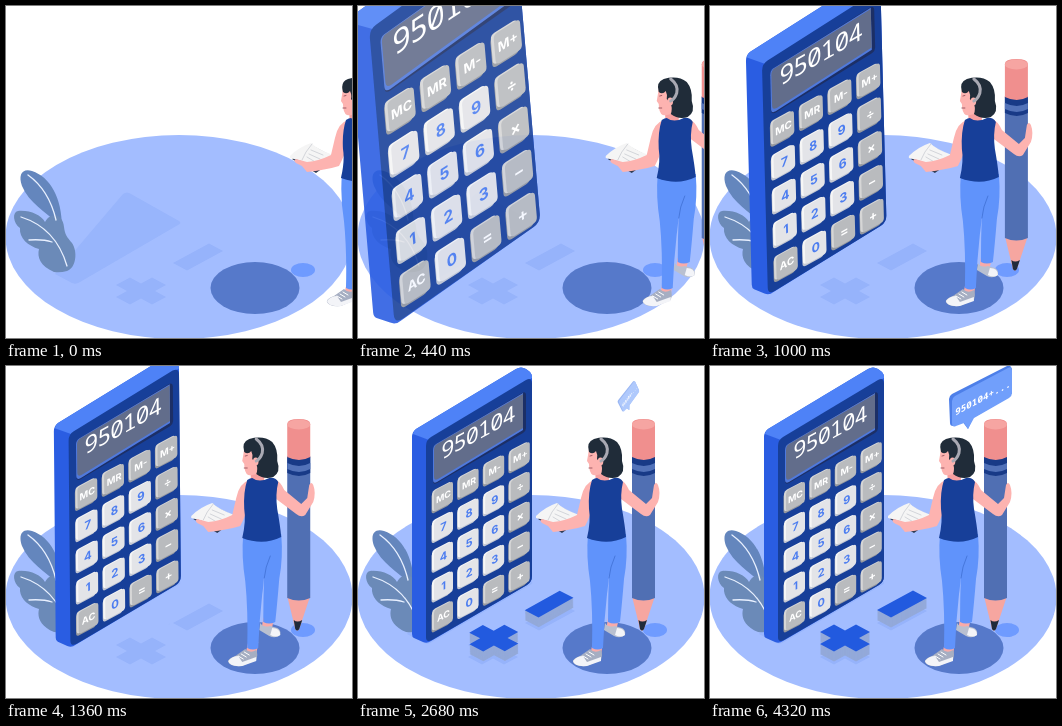
Animation of 346x332 px, one loop 4360 ms. Source, as an HTML page:

```html
<!DOCTYPE html>
<html lang="en">
<head>
<meta charset="utf-8">
<title>Calculator scene</title>
<style>
html, body { margin: 0; width: 100%; height: 100%; overflow: hidden; background: #fff; }
svg { display: block; width: 346px; height: 332px; }
text { text-anchor: middle; }
.mono { font-family: "Noto Sans Mono", "DejaVu Sans Mono", monospace; fill: #fff; }
.key { font-family: Inter, "Liberation Sans", sans-serif; font-weight: 700; }
.line { fill: none; stroke-linecap: round; stroke-linejoin: round; }
</style>
</head>
<body>
<svg viewBox="0 0 346 332">
  <!-- floor and shadows -->
  <ellipse cx="173" cy="231" rx="173.5" ry="102" fill="#a3bdff"/>
  <path d="M117 188Q121 185 125 188L173 215Q176 217 172 219L74 276Q70 279 66 277L49 268Z" fill="#98b5fc"/>
  <g id="floorMarks" fill="#96b3fb" transform="translate(0 13)"></g>
  <ellipse cx="249" cy="282" rx="44.500" ry="26" fill="#5679ca"/>
  <ellipse cx="297" cy="264" rx="12" ry="7" fill="#6f9bff"/>

  <!-- plant -->
  <path d="M51 217C40 206 23 197 16 180C12 169 16 162 26 165C44 171 56 191 56 222Z" fill="#6486bd"/>
  <path d="M48 266C34 260 31 251 33 243C22 240 13 232 14 222C7 217 6 206 12 205C24 204 35 209 39 216C45 205 57 208 58 221C59 229 61 231 66 237C72 246 70 262 61 265Q54 267 48 266Z" fill="#6b8ab8"/>
  <path class="line" d="M22 169Q43 184 50 214M15 211Q50 222 61 260M23 234Q37 233 46 236" stroke="#e8f0ff" stroke-width="1.3"/>

  <g id="calc">
    <path d="M54 71Q54 66 58 63L158 3Q163 0 168 3L172 6Q174 8 174 12V210Q174 216 169 219L73 275Q69 278 65 276L56 272Q54 271 54 268Z" fill="#2a5de2"/>
    <path d="M55 68Q55 65 58 63L158 3Q163 0 168 3L172 6Q174 8 174 12L71 74Z" fill="#4e82f7"/>
    <path d="M68 80Q68 74 73 71L168 14Q174 11 174 18V210Q174 216 169 219L74 274Q68 277 68 271Z" fill="#173f99"/>
    <path d="M75 84Q75 80 78 78L164 27Q168 25 168 29V62Q168 65 165 67L79 117Q75 119 75 115Z" fill="#1c2f66"/>
    <path d="M75 84Q75 80 78 78L165 27V64L79 116Q75 118 75 114Z" fill="#4f79dd"/>
    <path d="M76 84Q76 80 79 78L165 28V62L80 113Q76 115 76 111Z" fill="#626d8b"/>
    <text class="mono" font-size="22" letter-spacing="-.9" transform="matrix(1 -.54 0 1 120 74)">950104</text>
    <g id="keys" transform="matrix(1 -.52 0 1 84.500 131)"></g>
  </g>

  <g id="marks"></g>

  <g id="person">
    <!-- pencil -->
    <path d="M274 230H297L286 263Q284 266 282 263Z" fill="#f6a6a0"/>
    <path d="M280.500 254Q284 257 289 254L286 263Q284 266 282 263Z" fill="#202b3b"/>
    <path d="M274 90H297V232Q285.500 237 274 232Z" fill="#506fb3"/>
    <path d="M274 58Q274 53 285.500 53T297 58V92Q286 97 274 92Z" fill="#f08f8e"/>
    <ellipse cx="285.500" cy="58.500" rx="11.500" ry="5" fill="#f6a5a2"/>
    <path d="M274 91Q286 97 297 91V107Q286 113 274 107Z" fill="#183a87"/>
    <path d="M274 97Q286 103 297 97V103Q286 109 274 103Z" fill="#5272b9"/>

    <!-- shoes and legs -->
    <path d="M250 252H261L258 265H248ZM235 276H245L243 289H232Z" fill="#f9aba9"/>
    <path d="M247 257Q250 262 257 260L264 262Q268 264 267 269Q262 273 256 270L246 264Z" fill="#b9c0d0"/>
    <path d="M232 283Q237 288 243 284Q245 288 243 294L229 300Q217 301 215 296Q214 293 222 290Z" fill="#a6aec2"/>
    <path d="M215 295Q219 290 225 290L229 296L243 291V295L229 300Q216 301 215 295ZM259 262Q267 262 267 269Q263 272 257 269Z" fill="#f3f4f8"/>
    <path class="line" d="M225 290L230 293M228 288L233 291M231 286L236 289" stroke="#fff" stroke-width="1"/>
    <path d="M230 168H268Q270 192 266 213Q264 238 262 256Q256 259 250 256Q250 232 251 208Q250 222 249 228Q246 255 245 282Q240 285 234 282Q235 245 232 215Q228 190 230 168Z" fill="#6093fb"/>
    <path class="line" d="M251 212Q252 201 257 190" stroke="#4677dc" stroke-width="1"/>

    <!-- book -->
    <path d="M180 153L204 167L222 154V151L199 139Z" fill="#2d3a52"/>
    <path d="M178 150Q187 141 199 137Q205 143 221 149Q211 155 205 164Q195 155 178 152Z" fill="#f5f5f5"/>
    <path class="line" d="M200 138Q193 146 190 154M199 144L211 149M197 148L208 153M195 151L205 157" stroke="#d3d5da" stroke-width="1"/>

    <!-- arms, neck, top -->
    <path d="M236 114Q226 117 223 132L219 149Q207 155 195 156L184 153Q181 154 184 157L190 160L195 166Q213 164 227 160Q232 151 237 135Z" fill="#fdb3b0"/>
    <path d="M261 113Q267 115 271 124L288 138L294 132L296 119Q298 115 300 119Q303 127 300 136L292 149Q288 152 283 148L263 133Z" fill="#fdb3b0"/>
    <path d="M237 102H251V120H238Z" fill="#f69f9f"/>
    <path d="M234 114Q237 112 239 112Q246 117 256 112Q262 111 265 116Q262 128 264 143Q267 160 268 171Q250 180 229 172Q233 155 231 143Q230 126 234 114Z" fill="#173f99"/>

    <!-- head -->
    <path d="M231 82Q230 90 229 95L231 98Q231 107 235 109Q242 110 248 106V82Z" fill="#fdb3b0"/>
    <path d="M231 86Q228 76 236 73Q250 69 259 76Q265 83 264 95Q268 106 260 111Q251 114 243 108Q245 103 243 98L239 93Q240 89 238 85Q235 89 231 86Z" fill="#202c39"/>
    <ellipse cx="242.500" cy="95.500" rx="2.800" ry="4" fill="#fdb3b0"/>
    <path class="line" d="M243 73Q251 79 249 87Q247 93 243 95" stroke="#a9a9b3" stroke-width="3"/>
    <path class="line" d="M232 90L234 89.500M231 102L234 102" stroke="#8a4552" stroke-width=".8"/>
  </g>

  <g id="bubble">
    <path d="M239 33Q239 30 242 28L297 0Q300 -1 301 1L302 3V27L299 31L263 52L258 63L252 55L243 60Q240 60 240 57Z" fill="#4d7fe9"/>
    <path d="M242 35Q242 32 245 30L298 2Q302 0 302 4V27Q302 30 299 32L264 52L258 63L254 57L246 60Q242 62 242 57Z" fill="#719ffb"/>
    <text class="mono" font-size="9.300" font-weight="700" transform="matrix(1 -.53 0 1 273 35)">950104+...</text>
  </g>
</svg>
<script>
const LOOP = 4360;
const $ = id => document.getElementById(id);
const clamp = v => Math.min(1, Math.max(0, v));

// Keypad
const rows = ["MC MR M- M+", "7 8 9 ÷", "4 5 6 ×", "1 2 3 −", "AC 0 = +"];
$("keys").innerHTML = rows.map((row, r) => row.split(" ").map((label, c) => {
  const digit = /\d/.test(label);
  const [side, edge, face, ink] = digit
    ? ["#c4c8d2", "#f6f6f6", "#e3e4e8", "#4c7df0"]
    : ["#96999f", "#d6d6d6", "#b9bbbe", "#fff"];
  const box = (x, y, fill) =>
    `<rect x="${x}" y="${y}" width="19" height="21" rx="3" fill="${fill}"/>`;
  const size = label.length > 1 ? 9 : 11;
  return `<g transform="translate(${c * 25.6} ${r * 29.8})">` +
    box(-11, -9.5, side) + box(-10.5, -11.5, edge) + box(-8.5, -10.5, face) +
    `<text class="key" font-size="${size}" x="1" y="${size * 0.36}" fill="${ink}">${label}</text></g>`;
}).join("")).join("");

// Isometric plus and minus: u runs up-right, v runs down-right
const iso = (cx, cy, pts) => "M" + pts.map(([u, v]) =>
  `${cx + u + v} ${(cy + 0.54 * (v - u)).toFixed(2)}`).join("L") + "Z";
const bar = [[-18, -7], [18, -7], [18, 7], [-18, 7]];
const cross = [[-18, -7], [-7, -7], [-7, -18], [7, -18], [7, -7], [18, -7],
  [18, 7], [7, 7], [7, 18], [-7, 18], [-7, 7], [-18, 7]];
const signs = `<path d="${iso(135, 272, cross)}${iso(192, 238, bar)}"/>`;
$("floorMarks").innerHTML = signs;
for (let y = 10; y >= 0; y--) {
  $("marks").innerHTML +=
    `<g transform="translate(0 ${y})" fill="${y ? "#93a9d9" : "#225adf"}">${signs}</g>`;
}

// cubic-bezier(.25, .1, .25, 1)
function ease(x) {
  x = clamp(x);
  const curve = (s, a, b) => 3 * a * s * (1 - s) ** 2 + 3 * b * s * s * (1 - s) + s ** 3;
  let lo = 0, hi = 1;
  for (let i = 0; i < 24; i++) {
    const mid = (lo + hi) / 2;
    if (curve(mid, 0.25, 0.25) < x) lo = mid; else hi = mid;
  }
  return curve(lo, 0.1, 1);
}

function place(id, x, y, dx, dy, angle, scale, alpha) {
  $(id).setAttribute("transform",
    `translate(${x + dx} ${y + dy}) rotate(${angle}) scale(${scale}) translate(${-x} ${-y})`);
  $(id).setAttribute("opacity", clamp(alpha));
}

function popIn(id, x, y, p) {
  place(id, x, y, 0, 0, -40 * (1 - p), p, p * 1.45);
}

function draw(now) {
  const t = now % LOOP;
  const p = ease(t / 2000), rest = 1 - p;
  place("calc", 160, 209, 2 * rest, -2 * rest, -7.5 * rest, 1 + 0.69 * rest, p * 2.6);
  $("person").setAttribute("transform", `translate(${106 * rest} 0)`);
  popIn("marks", 163.5, 258, ease((t - 1300) / 1700));
  popIn("bubble", 270.5, 30.5, ease((t - 2200) / 2000));
}

const start = performance.now();
function tick() {
  draw(performance.now() - start);
  requestAnimationFrame(tick);
}
tick();
</script>
</body>
</html>
```
